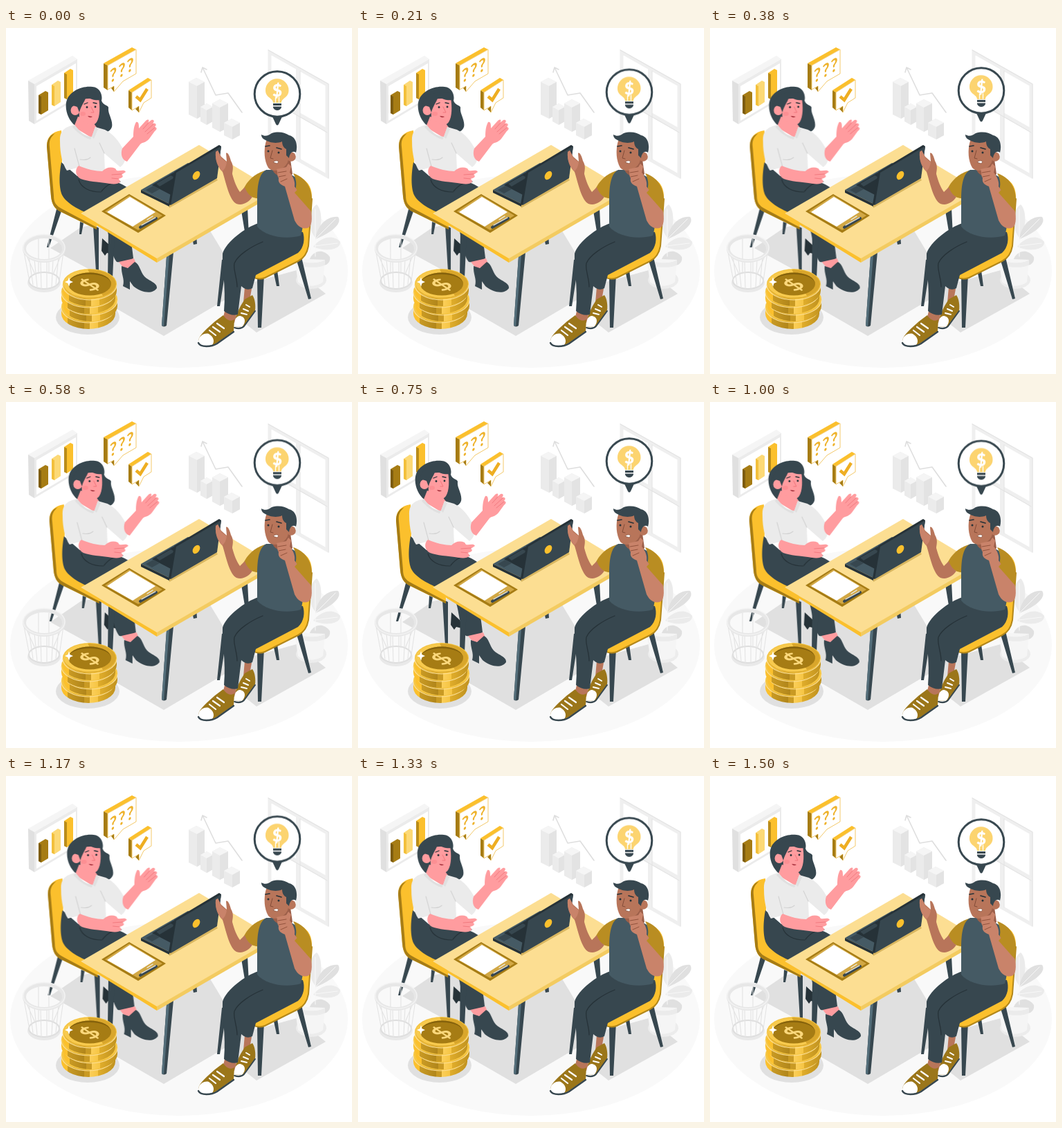
An HTML page that plays this animation: 500x500 px, repeating every 1540 ms.

```html
<!DOCTYPE html>
<html lang="en">
<head>
<meta charset="utf-8">
<title>Business consultation</title>
<style>
html, body { margin: 0; width: 100%; height: 100%; overflow: hidden; background: #fff; }
svg { display: block; width: 100vw; height: 100vh; }
text { font-family: Lato, "Open Sans", sans-serif; font-weight: 700; text-anchor: middle; }
.dark { fill: #37474f; } .slate { fill: #455a64; } .ink { fill: #263238; }
.gold { fill: #fbc02d; } .pale { fill: #fcde92; } .brown { fill: #a67c14; }
.pink { fill: #ff9c9f; } .tan { fill: #b8755a; } .tan2 { fill: #c9836a; }
.g1 { fill: #f5f5f5; } .g2 { fill: #ebebeb; } .g3 { fill: #e0e0e0; }
.white { fill: #fff; }
.line { fill: none; stroke-linecap: round; stroke-linejoin: round; }
#guest { animation: shake 1.54s infinite ease-in-out; }
#idea { animation: float 1.54s infinite linear; }
/* 1.5 s of motion, then a short rest */
@keyframes shake {
  0%, 97.4%, 100% { transform: translateX(0); }
  9.74%, 87.66% { transform: translateX(-1px); }
  19.48%, 77.92% { transform: translateX(2px); }
  29.22%, 48.7%, 68.18% { transform: translateX(-4px); }
  38.96%, 58.44% { transform: translateX(4px); }
}
@keyframes float {
  0%, 97.4%, 100% { transform: translateY(0); }
  48.7% { transform: translateY(-10px); }
}
</style>
</head>
<body>
<svg viewBox="0 0 500 500">
<defs>
  <linearGradient id="rim">
    <stop offset="0" stop-color="#fbc02d"/><stop offset=".12" stop-color="#fbc02d"/>
    <stop offset=".12" stop-color="#c99a24"/><stop offset=".42" stop-color="#b1861b"/>
    <stop offset=".42" stop-color="#c99a24"/><stop offset=".52" stop-color="#c99a24"/>
    <stop offset=".52" stop-color="#fbcf5a"/><stop offset=".68" stop-color="#f6c544"/>
    <stop offset=".68" stop-color="#e0ad2b"/><stop offset="1" stop-color="#c0921f"/>
  </linearGradient>
  <g id="coin">
    <path d="M-39 0V10A39 22 0 0 0 39 10V0Z" fill="url(#rim)"/>
    <ellipse rx="39" ry="22" fill="#f6c643"/>
    <path d="M-39 1A39 22 0 0 0 39 1" class="line" stroke="#fcde92" stroke-width="1.2"/>
  </g>
</defs>

<!-- floor and shadows -->
<ellipse cx="250" cy="351" rx="244" ry="140" fill="#f9f9f9"/>
<path class="g3" d="M64 318L108 288L150 280L290 285L345 376L228 445L150 400V365Z"/>
<path class="g3" d="M318 405L362 440L462 384L420 350L340 372Z"/>

<!-- chart panel -->
<path class="g1" d="M32 76L96 40L103 45L41 81Z"/>
<path class="g3" d="M32 76L41 81V139L33 134Z"/>
<path d="M41 81L103 45V102L41 139Z" fill="#ebebeb"/>
<path class="white" d="M44 84L101 51V100L44 134Z"/>
<g>
  <path class="brown" d="M47 97L57 91L61 93V119L51 125L47 123Z"/>
  <path d="M47 97L51 99V125L47 123Z" fill="#7d5c0c"/>
  <path d="M66 82L75 76L79 78V107L70 113L66 111Z" fill="#fcd976"/>
  <path d="M66 82L70 84V113L66 111Z" fill="#f3c03c"/>
  <path d="M84 65L93 59L97 61V97L88 103L84 101Z" class="gold"/>
  <path d="M84 65L88 67V103L84 101Z" fill="#b98c1a"/>
</g>

<!-- speech bubbles -->
<path class="brown" d="M141 51L147 54V90L141 86Z"/>
<path class="gold" d="M141 51L182 28L188 31L147 54Z"/>
<path d="M147 54L188 31V66L169 77L156 92V84L147 89Z" fill="#fff" stroke="#f3c96a" stroke-width="1"/>
<path class="brown" d="M152 87L156 84V92Z"/>
<g fill="#eeb22b" font-size="26">
  <text transform="matrix(.87 -.5 0 1 155 77)">?</text>
  <text transform="matrix(.87 -.5 0 1 167.5 70)">?</text>
  <text transform="matrix(.87 -.5 0 1 179.5 63)">?</text>
</g>
<path class="brown" d="M177 90L182 93V119L177 115Z"/>
<path class="gold" d="M177 90L205 72L210 75L182 93Z"/>
<path d="M182 93L210 75V101L199 108L192 122V113L182 119Z" fill="#fff" stroke="#f3c96a" stroke-width="1"/>
<path class="brown" d="M187 117L192 113V122Z"/>
<path class="line" d="M188 99L194 104L204 88" stroke="#eeae22" stroke-width="4.5" style="stroke-linecap:butt;stroke-linejoin:miter"/>

<!-- grey chart -->
<g class="g1">
  <path class="g2" d="M264 78L275 72L287 78V125L276 131L264 125Z"/><path d="M264 78L275 72L287 78L276 84Z"/><path d="M276 84L287 78V125L276 131Z" fill="#e3e3e3"/>
  <path class="g2" d="M281 114L290 109L299 114V135L290 140L281 135Z"/><path d="M281 114L290 109L299 114L290 119Z"/><path d="M290 119L299 114V135L290 140Z" fill="#e3e3e3"/>
  <path class="g2" d="M298 109L309 103L321 109V144L309 150L298 144Z"/><path d="M298 109L309 103L321 109L309 115Z"/><path d="M309 115L321 109V144L309 150Z" fill="#e3e3e3"/>
  <path class="g2" d="M315 137L326 131L338 137V155L327 161L315 155Z"/><path d="M315 137L326 131L338 137L327 143Z"/><path d="M327 143L338 137V155L327 161Z" fill="#e3e3e3"/>
</g>
<path class="line" d="M341 122L321 94L303 97L284 57M282 64L284 57L290 60" stroke="#dedede" stroke-width="1.6"/>

<!-- window -->
<path d="M381 35L464 82V214L381 167Z" class="line" stroke="#efefef" stroke-width="5" style="stroke-linejoin:miter"/>
<path d="M422 58V191M381 101L464 148" class="line" stroke="#efefef" stroke-width="6" style="stroke-linecap:butt"/>
<path d="M379 32L466 81V217M425 62V190M384 105L464 151" class="line" stroke="#e2e2e2" stroke-width="1"/>

<!-- plant -->
<ellipse cx="441" cy="364" rx="22" ry="13" fill="#ececec"/>
<path class="g2" d="M446 302C434 285 438 262 449 255C458 264 457 288 449 303Z"/>
<path class="g3" d="M447 305C449 287 463 271 480 273C487 283 468 297 447 305Z"/>
<path class="g2" d="M444 316C455 301 474 298 483 309C484 321 460 324 444 316Z"/>
<path class="g3" d="M438 336C443 321 459 318 468 331C470 346 450 347 438 336Z"/>
<path class="line" d="M447 262V330M448 304L476 276M446 315L479 311" stroke="#f8f8f8"/>
<path class="g1" d="M417 333L461 335L458 367C449 375 430 374 422 367Z"/>
<path class="g2" d="M417 333C428 340 451 342 461 335L460 343C448 348 427 346 418 340Z"/>

<!-- idea bubble -->
<g id="idea">
  <path class="dark" d="M384 126H400L394 139Q392 142 390 139Z"/>
  <circle cx="392" cy="95.5" r="32.8" fill="#fff" stroke="#37474f" stroke-width="3"/>
  <path d="M386 108C386 101 375 101 375 90A16.7 16.7 0 0 1 408.500 90C408.500 101 398 101 398 108Z" fill="#fcd470"/>
  <path class="line" d="M389.500 107V100M394.500 107V100" stroke="#fff" stroke-width="1.3"/>
  <text x="392" y="99" font-size="24" fill="#fff" style="font-weight:900">$</text>
  <path class="dark" d="M386 109H398V112H386ZM386 113.500H398V115Q396 119 392 119T386 115Z"/>
</g>

<!-- woman and chair -->
<g id="guest">
  <path class="dark" d="M74 258L81 262L62 317H59ZM107 280L112 282L109 298H106ZM126 285L134 289V352H130Z"/>
  <path class="gold" d="M80 148C66 150 59 158 59 170L65 243C66 254 70 261 78 265L131 291V283L125 262L82 240Z"/>
  <path class="brown" d="M67 154C61 158 59 164 59 172L65 243C66 254 70 261 78 265L131 291V288L82 262C72 257 69 252 69 242L63 172C62 163 64 158 71 152Z"/>
  <path class="ink" d="M139 304L151 315L158 328L146 325L143 329L138 322Z"/>
  <path class="dark" d="M80 194C76 215 77 235 82 243C90 256 110 264 122 270L146 291C150 303 151 327 160 338C169 339 178 336 184 333C182 315 181 305 174 292L181 235C167 222 145 216 103 214Z"/>
  <path class="line" d="M105 219C108 231 121 237 137 237M138 236C147 225 154 223 165 222" stroke="#263238" stroke-width="1.2"/>
  <path class="pink" d="M163 338L185 333L189 343L171 348Z"/>
  <path class="dark" d="M167 344L176 347L186 338C193 341 194 352 200 359C207 366 219 368 218 376C212 385 196 383 184 373L179 366V378L169 373C172 362 166 356 167 344Z"/>

  <!-- hair, neck and blouse -->
  <path class="dark" d="M88 104C92 92 109 83 125 85C136 86 140 97 138 105C141 113 149 111 148 116C147 124 155 133 153 143C150 151 142 152 135 151L100 141C89 133 84 115 88 104Z"/>
  <path class="pink" d="M104 128L124 134L132 145L126 160L98 143Z"/>
  <path d="M99 140C84 143 77 149 78 164C78 183 82 197 88 206L106 201L106 216C123 221 135 217 143 207L142 181L165 201C173 195 174 187 170 177C164 164 155 153 143 147L129 143L124 157C113 157 106 149 99 140Z" fill="#ebebeb"/>
  <path class="line" d="M106 200L99 174M142 181L135 166M107 190C113 191 119 190 122 187" stroke="#d2d2d2" stroke-width="1.1"/>
  <path class="g3" d="M99 140C106 149 113 157 124 157L122 161C111 158 102 150 96 143ZM129 143L133 146L127 160L124 157Z"/>

  <!-- face -->
  <path class="pink" d="M105 103L134 101C136 114 136 128 131 136C126 144 113 139 106 130Z"/>
  <ellipse class="pink" cx="100" cy="119" rx="6.500" ry="7"/>
  <path class="dark" d="M94 111C94 98 109 90 134 94L137 104C129 105 121 103 116 99C113 108 108 113 106 122L103 114Z"/>
  <path d="M123 114L127 122L123 122" class="line" stroke="#f0767c"/>
  <path class="line" d="M113 110L118 108M126 108L131 109" stroke="#263238" stroke-width="1.3"/>
  <circle class="ink" cx="117" cy="114.500" r="1.4"/><circle class="ink" cx="129" cy="114" r="1.4"/>
  <path d="M118 127Q121 131 125 128Z" fill="#a52e3a"/>
  <ellipse cx="111" cy="124" rx="4" ry="3" fill="#fa8288" opacity=".5"/>

  <!-- arms -->
  <path class="pink" d="M168 174L184 157C184 148 185 141 188 136C192 135 192 140 192 145L202 134C206 131 208 133 205 137L210 133C214 132 215 135 212 138C217 137 218 140 215 143C219 144 218 147 215 149L207 160C202 166 197 165 194 168L175 193C168 191 165 183 168 174Z"/>
  <path class="line" d="M198 146L206 137M201 150L213 139M204 153L215 144" stroke="#f0767c" stroke-width=".9"/>
  <path class="pink" d="M105 199C116 204 130 207 139 207C144 202 151 200 158 203L160 206C165 207 171 204 173 208L167 212C171 214 168 217 162 218C169 222 163 227 150 225C132 222 118 222 108 218C100 214 99 204 105 199Z"/>
  <path class="line" d="M153 212L167 211M153 217L163 218" stroke="#f0767c" stroke-width=".9"/>
</g>

<!-- table -->
<path class="dark" d="M266 288L274 284L276 312L271 313ZM340 264L349 260L351 300H346ZM148 290L157 296L154 362H147Z"/>
<path class="dark" d="M232 330L242 324L232 430Q228 433 225 430Z"/>
<path d="M232 330L236 328L228 431L225 430Z" fill="#546e7a"/>
<path class="pale" d="M279 169L389 235L218 334L108 268Z"/>
<path d="M108 268L218 333V339L108 271Z" fill="#fbc02d"/>
<path d="M218 333L389 234V240L218 339Z" fill="#f3cb60"/>

<!-- clipboard -->
<path class="brown" d="M178 240L231 271L191 296L138 265Z"/>
<path d="M178 242L226 271L191 292L143 265Z" fill="#d2a845"/>
<path class="white" d="M179 244L216 266L183 287L146 266Z"/>
<path class="line" d="M194 288L217 275" stroke="#37474f" stroke-width="4"/>
<path class="line" d="M196 285L216 274M204 277L212 272" stroke="#ececec" stroke-width="1.4"/>

<!-- laptop -->
<path d="M236 260L306 220L302 214L234 252Z" fill="#d9b65f"/>
<path class="slate" d="M195 234L263 195L304 217L236 254Z"/>
<path class="ink" d="M195 234L236 254V258L195 238Z"/>
<path class="ink" d="M211 227L242 209L255 217L238 241Z"/>
<path class="dark" d="M217 225L238 213L244 216L222 229ZM202 234L213 228L222 233L211 239Z"/>
<path d="M243 208L308 169L311 171L304 217L237 256L235 255Z" fill="#263238"/>
<path class="dark" d="M246 209L311 171L305 217L238 256Z"/>
<ellipse class="gold" cx="275" cy="213" rx="4.600" ry="6.800" transform="rotate(34 275 213)"/>

<!-- man's chair -->
<path class="dark" d="M312 335L320 332L309 402H305ZM386 350L392 350L395 373H391ZM420 336L427 331L441 391L437 392ZM363 358L373 356L369 433H364Z"/>
<path class="gold" d="M425 216C438 222 443 233 442 249L437 315C435 327 430 333 422 337L374 361C367 364 360 362 355 359L357 348L425 302Z"/>
<path class="line" d="M442 247L437 315C435 327 430 333 422 337L374 361C367 364 360 362 355 359" stroke="#b38719" stroke-width="2"/>

<!-- far leg and shoe -->
<path class="tan" d="M345 374L355 377L352 394L343 397Z"/>
<path d="M330 431C329 420 337 404 345 392L356 386C360 391 361 402 360 408C352 420 347 429 341 432Z" fill="#9b761a"/>
<path class="white" d="M330 431C328 423 333 416 338 416C345 417 348 424 341 432Z"/>
<path class="line" d="M340 412L348 414M343 406L350 409M347 400L352 403" stroke="#fff" stroke-width="2"/>
<path class="line" d="M330 433Q339 436 344 431L360 409" stroke="#37474f" stroke-width="2"/>

<!-- near shoe -->
<path class="tan" d="M317 405L334 410L330 426L313 422Z"/>
<path d="M278 453C278 444 291 434 302 424L314 415C318 422 325 425 330 421L329 438L305 455C295 461 281 462 278 453Z" fill="#9b761a"/>
<path class="white" d="M278 453C278 445 287 440 293 442C300 446 302 453 298 458C289 461 279 461 278 453Z"/>
<path class="line" d="M294 437L303 444M299 432L309 439M305 427L315 434" stroke="#fff" stroke-width="2.2"/>
<path class="line" d="M278 455C281 462 297 461 305 456L329 439" stroke="#37474f" stroke-width="2.4"/>

<!-- trousers -->
<path class="dark" d="M365 282C346 288 318 309 313 326C312 346 318 374 315 409C321 414 329 416 335 414L340 373C345 378 351 379 356 376L361 357L422 325C431 317 432 304 429 295Z"/>
<path class="line" d="M371 309C354 316 335 328 330 340C328 349 334 361 334 374" stroke="#263238" stroke-width="1.3"/>

<!-- left arm, torso -->
<path d="M374 206C358 211 348 222 343 233C350 243 358 247 367 246Z" fill="#b98d22"/>
<path class="tan" d="M345 230C348 238 353 243 356 244C351 252 342 257 333 254C323 249 318 224 313 208C306 201 302 192 303 179L306 177L311 186L319 193L318 181C320 179 323 184 325 192C330 200 327 207 327 211C330 222 333 230 338 237Z"/>
<path class="tan2" d="M303 179L306 177L311 188L319 194C318 200 316 204 313 207C307 202 302 192 303 179Z"/>
<path class="slate" d="M376 205C366 210 363 226 363 248V287C374 300 402 307 426 300C432 280 432 247 428 224C418 213 402 204 376 205Z"/>
<path d="M415 210C432 215 443 231 442 250L438 266L414 242C421 231 421 221 415 210Z" fill="#b98d22"/>

<!-- head -->
<path d="M389 192L411 190L414 211C407 220 392 216 386 207Z" fill="#9c5f49"/>
<path class="tan" d="M376 163C372 176 373 192 379 202C386 210 402 205 407 194L412 171L397 158Z"/>
<circle class="tan" cx="412" cy="186" r="6.800"/>
<path class="dark" d="M369 154C374 157 379 156 384 152C394 149 403 151 409 155C419 157 422 169 419 180C415 177 410 180 409 188L405 184V175C401 173 399 169 399 164C390 168 380 165 375 162C371 160 369 158 369 154Z"/>
<path class="line" d="M375 171L381 170M391 173L398 175" stroke="#263238" stroke-width="1.7"/>
<circle class="ink" cx="379" cy="178" r="1.500"/><circle class="ink" cx="394" cy="180" r="1.500"/>
<path class="line" d="M385 177L382 188L386 189" stroke="#834c38"/>
<path d="M386 194Q390 190 394 193L392 196Z" fill="#fff" stroke="#834c38" stroke-width=".7"/>

<!-- right arm -->
<path class="tan2" d="M391 204L405 201L408 196L412 200L410 209C416 216 418 223 417 229L439 260C443 269 443 284 438 288C430 292 422 288 417 278L403 229C395 226 393 222 394 217C391 212 393 209 391 204Z"/>
<path class="line" d="M393 209L405 207M394 215L404 213M397 222L406 218" stroke="#92533d" stroke-width="1"/>
<path d="M428 226C437 231 442 241 442 251L440 264L417 238Z" fill="#b98d22"/>

<!-- bin -->
<ellipse cx="55" cy="368" rx="24" ry="14" fill="#e9e9e9"/>
<ellipse cx="55" cy="365" rx="22" ry="12" fill="#fafafa" stroke="#dedede" stroke-width="2"/>
<path class="line" d="M26 324L34 366M33 330L39 371M41 334L45 374M50 336L51 377M59 336L59 377M68 334L66 375M76 330L72 371M83 324L77 366M28 325L42 356M81 325L68 356M47 305V355M62 305V355" stroke="#e3e3e3" stroke-width="1.1"/>
<ellipse cx="55" cy="319" rx="28.500" ry="17.500" fill="none" stroke="#e7e7e7" stroke-width="5"/>
<ellipse cx="55" cy="317.500" rx="30" ry="19" fill="none" stroke="#f2f2f2" stroke-width="1.5"/>

<!-- coins -->
<ellipse cx="118" cy="418" rx="46" ry="25" class="g3"/>
<use href="#coin" x="119" y="403"/>
<use href="#coin" x="122" y="392"/>
<use href="#coin" x="119" y="381"/>
<use href="#coin" x="121" y="370"/>
<ellipse cx="121" cy="370" rx="38" ry="21" fill="#d9a62b"/>
<path d="M83 370A38 21 0 0 1 118 349L140 387A38 21 0 0 1 83 370Z" fill="#f8ca4d"/>
<ellipse cx="121" cy="370" rx="31" ry="16.500" class="brown"/>
<path d="M90 370A31 16.500 0 0 1 152 370A31 14 0 0 0 90 370Z" fill="#85620c"/>
<text transform="matrix(.87 -.5 .87 .5 131 377)" font-size="33" fill="#fbd87c">$</text>
<path class="white" d="M91 360L92.500 365L97 367L92.500 369L91 374L89.500 369L85 367L89.500 365Z"/>
</svg>
</body>
</html>
```
